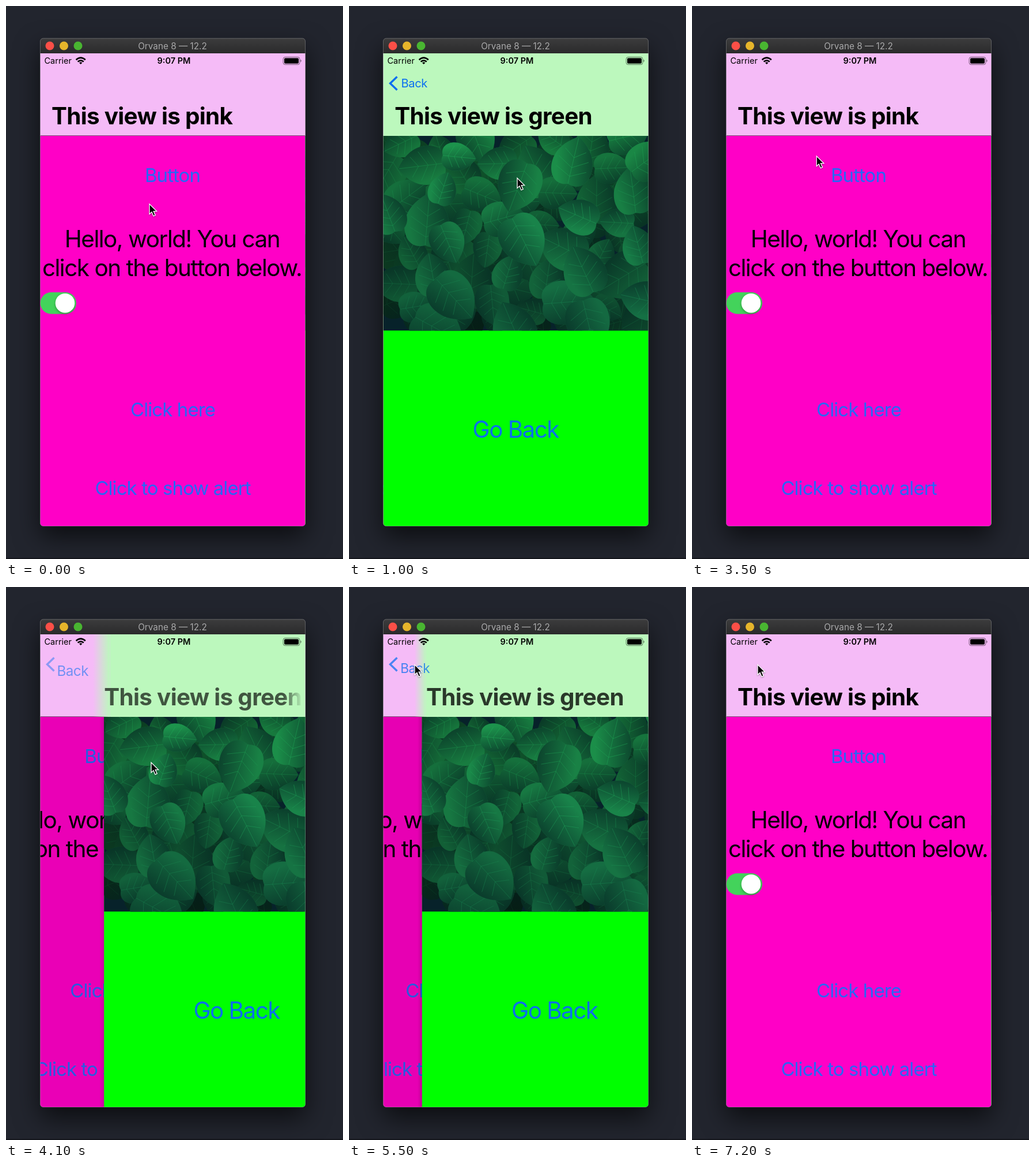
These frames come from a looping animation (585 by 958 pixels, 7300 ms). An HTML page:

```html
<!DOCTYPE html>
<html lang="en">
<head>
<meta charset="utf-8">
<title>Navigation demo</title>
<style>
  html, body { margin: 0; height: 100%; overflow: hidden; background: #22252e; }
  svg { display: block; width: 585px; height: 958px; }
  text { font-family: Inter, Roboto, sans-serif; font-optical-sizing: none; white-space: pre; }
  .mid { text-anchor: middle; }
  .title { font-size: 40.4px; font-weight: 700; letter-spacing: -.017em; }
  .body { font-size: 40.4px; letter-spacing: -.036em; }
  .link { font-size: 33px; letter-spacing: -.028em; fill: #2767f5; }
  .go { font-size: 40.4px; letter-spacing: -.038em; fill: #0b6ff0; }
  .status { font-size: 14.5px; }
  .frame { filter: drop-shadow(0 18px 22px rgba(0, 0, 0, .65)); }
  .knob { filter: drop-shadow(0 2px 2px rgba(0, 0, 0, .3)); }
  .cursor { filter: drop-shadow(0 1px 1px rgba(0, 0, 0, .35)); }
</style>
</head>
<body>
<svg viewBox="0 0 585 958">
  <defs>
    <clipPath id="window"><rect x="59.5" y="56" width="460" height="845" rx="5"/></clipPath>
    <clipPath id="photo"><rect x="59" y="224.3" width="461" height="338"/></clipPath>
    <linearGradient id="bar" x2="0" y2="1">
      <stop stop-color="#3c3c3d"/><stop offset="1" stop-color="#2a2a2b"/>
    </linearGradient>
    <linearGradient id="titleFade" gradientUnits="userSpaceOnUse" x1="482" x2="515">
      <stop/><stop offset="1" stop-opacity="0"/>
    </linearGradient>
    <linearGradient id="navFade">
      <stop stop-color="#bcf8bd" stop-opacity="0"/><stop offset="1" stop-color="#bcf8bd"/>
    </linearGradient>
    <linearGradient id="edgeShadow">
      <stop stop-opacity="0"/><stop offset="1" stop-opacity=".18"/>
    </linearGradient>
    <linearGradient id="leafShade" x2=".3" y2="1">
      <stop offset=".2" stop-color="#04201f" stop-opacity="0"/><stop offset="1" stop-color="#04201f" stop-opacity=".6"/>
    </linearGradient>
    <path id="leaf" d="M-.9 0C-1.1-.55-.6-.85-.1-.8S.75-.4 1 0C.75 .4 .4 .75-.1 .8S-1.1 .55-.9 0"/>
    <path id="veins" d="M-.9 0H.95M-.6 0L-.3-.6M-.6 0L-.3 .6M-.25 0L.1-.6M-.25 0L.1 .6M.15 0L.45-.42M.15 0L.45 .42"/>
  </defs>

  <rect y="956" width="585" height="2" fill="#14161d"/>
  <rect class="frame" x="59.5" y="56" width="460" height="845" rx="5" fill="#222"/>

  <g clip-path="url(#window)">
    <g id="pinkView">
      <rect x="59" y="224" width="461" height="678" fill="#ff00c6"/>
      <text class="link mid" x="289" y="305">Button</text>
      <text class="body mid" x="288.5" y="418">Hello, world! You can</text>
      <text class="body mid" x="288" y="468">click on the button below.</text>
      <rect x="59.5" y="496" width="62.5" height="37.5" rx="18.7" fill="#43d35b"/>
      <circle class="knob" cx="102.5" cy="514.7" r="16.8" fill="#fff"/>
      <text class="link mid" x="289.5" y="711">Click here</text>
      <text class="link mid" x="289.5" y="847">Click to show alert</text>
    </g>
    <rect id="dim" x="59" y="224" width="461" height="678"/>

    <g id="greenView">
      <rect id="shadow" x="51" y="224" width="8" height="678" fill="url(#edgeShadow)"/>
      <rect x="59" y="224" width="461" height="678" fill="#0f0"/>
      <g clip-path="url(#photo)">
        <rect x="59" y="224" width="461" height="339" fill="#07222a"/>
        <g id="leaves"></g>
      </g>
      <text class="go mid" x="289" y="748">Go Back</text>
    </g>

    <rect x="59" y="82" width="461" height="143" fill="#f5bbf7"/>
    <path d="M59 224.5H520" stroke="#000" stroke-opacity=".5"/>
    <g id="greenNav">
      <rect id="navEdge" y="82" height="143" fill="url(#navFade)"/>
      <rect id="navFill" y="82" width="470" height="143" fill="#bcf8bd"/>
    </g>
    <text class="title" id="pinkTitle" x="79" y="205">This view is pink</text>
    <text class="title" id="greenTitle" y="205" fill="url(#titleFade)">This view is green</text>
    <text id="backLabel" letter-spacing="-.02em">Back</text>
    <path id="chevron" d="M83.5 122.5L71.5 134 83.5 145.5" fill="none" stroke="#0b6ff0" stroke-width="3.4"/>

    <text class="status" x="66.5" y="100">Carrier</text>
    <g fill="none" stroke="#000" stroke-width="2.6">
      <path d="M121.6 93.2Q129.7 86 137.8 93.2M124.6 96.6Q129.7 92.2 134.8 96.6"/>
      <path d="M127 98.2Q129.7 96.2 132.4 98.2L129.7 101Z" fill="#000" stroke="none"/>
    </g>
    <text class="status mid" x="291.5" y="100" font-weight="600">9:07 PM</text>
    <rect x="481.2" y="88.5" width="28.6" height="13" rx="3.2" fill="none" stroke="#000" stroke-opacity=".55"/>
    <rect x="483" y="90.2" width="25" height="9.6" rx="1.8"/>
    <path d="M511.3 92.6Q514 95 511.3 97.4Z" opacity=".6"/>

    <rect x="59" y="56" width="461" height="26" fill="url(#bar)"/>
    <circle cx="76" cy="69" r="7.5" fill="#fc4f47"/>
    <circle cx="100.5" cy="69" r="7.5" fill="#e6b52b"/>
    <circle cx="125" cy="69" r="7.5" fill="#49b531"/>
    <text class="mid" x="289" y="75" font-size="15.3" fill="#a9a9aa">Orvane 8 — 12.2</text>
  </g>
  <rect x="59.5" y="56" width="460" height="845" rx="5" fill="none" stroke="#fff" stroke-opacity=".25"/>
  <path id="cursor" class="cursor" d="M0 0V17.5L4 13.8 7 20.8 10.2 19.4 7.2 12.6H12.6Z" stroke="#fff" stroke-width="1.3"/>
</svg>

<script>
const LOOP = 7300, STEP = 100, WIDTH = 460, LEAF_COUNT = 110;
const el = Object.fromEntries([...document.querySelectorAll('[id]')].map(e => [e.id, e]));
const clamp = v => Math.max(0, Math.min(1, v));
const mix = (a, b, k) => a + (b - a) * k;
const smooth = k => k * k * (3 - 2 * k);
const set = (e, attrs) => { for (const k in attrs) e.setAttribute(k, attrs[k]); };

let seed = 7;
const random = () => (seed = seed * 16807 % 2147483647) / 2147483647;

// Evenly scattered leaves, dark at the back and lit in front, dimmer towards the bottom
function leaf(_, i) {
  const u = i * .7549 % 1, v = i * .5698 % 1, depth = i / LEAF_COUNT;
  const r = mix(28, 50, random()), light = mix(14, 33, depth) - 9 * v + 4 * random();
  const color = l => `hsl(${mix(143, 152, v)} 68% ${l}%)`;
  return `<g transform="translate(${59 + 461 * u} ${225 + 338 * v}) rotate(${random() * 360}) scale(${r})">
    <use href="#leaf" fill="${color(light)}"/>
    <use href="#leaf" fill="url(#leafShade)"/>
    <use href="#veins" fill="none" stroke="${color(light + 6)}" stroke-width="${.8 / r}" opacity=".6"/></g>`;
}
el.leaves.innerHTML = Array.from({ length: LEAF_COUNT }, leaf).join('');

// Critically damped spring, as in the platform's navigation transition
const spring = ms => {
  const u = Math.max(0, ms) * .01826;
  return 1 - (1 + u) * Math.exp(-u);
};
const pushed = t => spring(t - 450) - spring(t - 2215.6) + spring(t - 3950) - spring(t - 5463);

// The pointer glides between the button and the back link
const START = { x: 249, y: 343 }, BACK = { x: 114, y: 134.5 };
const GLIDES = [
  { from: 0, to: 400, x: 292, y: 298 },
  { from: 1200, to: 1900, ...BACK },
  { from: 3000, to: 3750, x: 252, y: 304 },
  { from: 4480, to: 5230, ...BACK }
];
const pointerAt = t => GLIDES.reduce((pos, g) => {
  const k = smooth(clamp((t - g.from) / (g.to - g.from)));
  return { x: mix(pos.x, g.x, k), y: mix(pos.y, g.y, k) };
}, START);

function draw(t) {
  const p = clamp(pushed(t)), nav = p ** .8;
  const offset = WIDTH * (1 - p), edge = 59 + offset, blur = 160 * p * (1 - p);
  const { x, y } = pointerAt(t);

  set(el.pinkView, { transform: `translate(${-.3 * WIDTH * p})` });
  set(el.dim, { opacity: .11 * p });
  set(el.greenView, { transform: `translate(${offset})` });
  set(el.shadow, { opacity: p });

  set(el.greenNav, { opacity: clamp(p * 8) });
  set(el.navEdge, { x: edge - blur * .65, width: blur });
  set(el.navFill, { x: edge + blur * .35 });
  set(el.pinkTitle, { opacity: clamp(1.05 - p * 2.2) });
  set(el.greenTitle, { x: 79 + WIDTH * (1 - nav), opacity: p * p * p + p * (1 - p) * 1.2 });
  set(el.backLabel, {
    x: mix(80, 90.5, nav), y: mix(205, 141, nav), 'font-size': mix(40.4, 20.2, nav),
    fill: p > .75 ? '#0b6ff0' : '#5a4a78', opacity: clamp((p - .48) * 2)
  });
  set(el.chevron, { opacity: clamp((p - .6) / .35) });
  set(el.cursor, { transform: `translate(${x} ${y})` });
}

function tick(now) {
  draw(Math.floor(now % LOOP / STEP) * STEP);
  requestAnimationFrame(tick);
}
draw(0);
requestAnimationFrame(tick);
</script>
</body>
</html>
```
